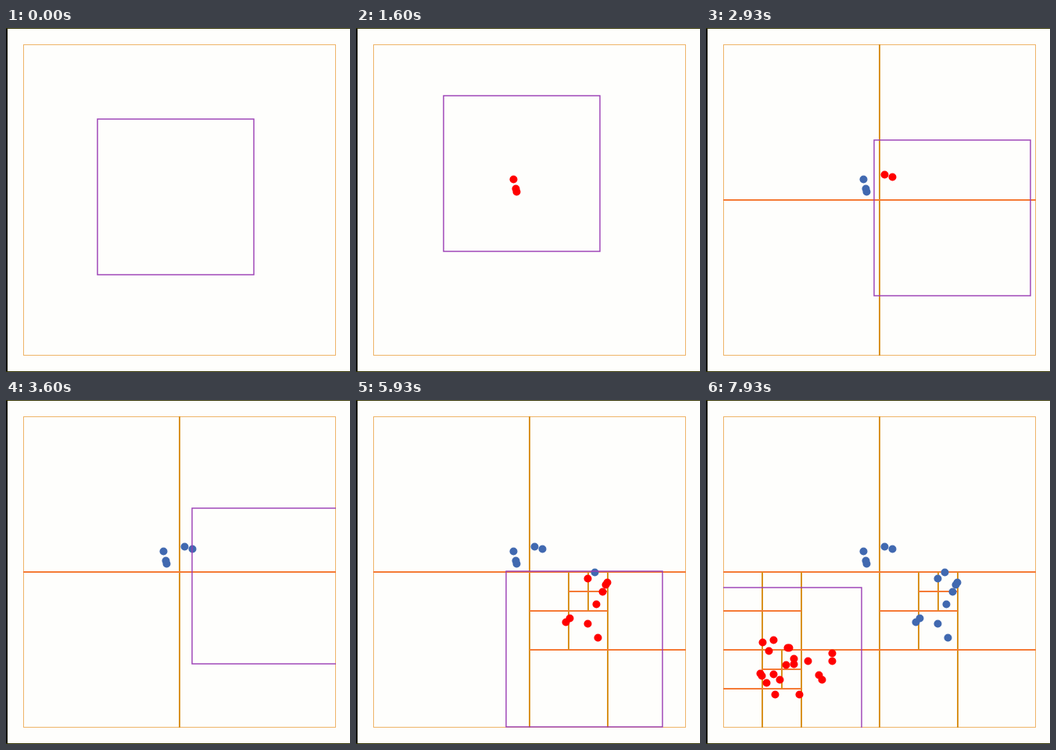
Animation, 440 px wide and 442 px high, one loop 8 s. Source, as an HTML page with a canvas:

```html
<!DOCTYPE html>
<html lang="en">
<head>
<meta charset="utf-8">
<title>Quadtree</title>
<style>
html, body { margin: 0; width: 100%; height: 100%; overflow: hidden; background: #fefefc; }
canvas { display: block; }
</style>
</head>
<body>
<canvas id="stage" width="440" height="442"></canvas>
<script>
const ctx = document.getElementById('stage').getContext('2d');
const STEPS = 120, LOOP = 8000, STEP = LOOP / STEPS;
const LEFT = 22, TOP = 21, SIZE = 400, REACH = 100, CAPACITY = 3;

// Bursts of clicks, spread evenly from first to last step.
// Stroke: start x, y, end x, y, number of clicks, gaining speed along the way.
const bursts = [
  { first: 17, last: 28, strokes: [[205, 210, 201, 194, 3], [228, 188, 238, 191, 2]] },
  { first: 60, last: 85, strokes: [
    [268, 285, 273, 280, 2], [309, 305, 296, 287, 2],
    [305, 221, 296, 229, 2], [321, 234, 307, 262, 4]] },
  { first: 93, last: 105, strokes: [
    [161, 325, 161, 335, 2], [148, 359, 130, 335, 3], [112, 332, 80, 322, 2],
    [106, 318, 104, 318, 2], [86, 308, 86, 308, 1]] },
  { first: 107, last: 118, strokes: [
    [72, 311, 72, 311, 1], [69, 351, 88, 378, 4],
    [86, 352, 119, 378, 3], [102, 340, 112, 339, 2]] }
];

// Where the pointer rests between bursts
const rests = [
  { step: 0, x: 217, y: 217 }, { step: 12, x: 210, y: 179 },
  { step: 34, x: 291, y: 249 }, { step: 54, x: 338, y: 239 },
  { step: 89, x: 292, y: 320 }, { step: 119, x: 99, y: 341 }
];

const mix = (a, b, k) => a + (b - a) * k;

function strokePoints([x0, y0, x1, y1, count]) {
  return Array.from({ length: count }, (_, i) => {
    const k = (i / Math.max(1, count - 1)) ** 2;
    return { x: Math.round(mix(x0, x1, k)), y: Math.round(mix(y0, y1, k)) };
  });
}

const drops = bursts.flatMap(({ first, last, strokes }) => {
  const points = strokes.flatMap(strokePoints);
  return points.map((p, i) =>
    ({ ...p, step: Math.round(mix(first, last, i / (points.length - 1))) }));
});

// The search box trails each click by a few pixels
const path = drops.map(d => ({ step: d.step, x: d.x - 3, y: d.y - 4 }))
  .concat(rests).sort((a, b) => a.step - b.step);

function pointerAt(step) {
  const i = path.findIndex(p => p.step > step);
  if (i < 0) return path[path.length - 1];
  const a = path[i - 1], b = path[i];
  const k = (step - a.step) / (b.step - a.step);
  return { x: Math.round(mix(a.x, b.x, k)), y: Math.round(mix(a.y, b.y, k)) };
}

const makeCell = (x, y, size) => ({ x, y, size, used: 0, kids: null });

function insert(cell, point) {
  if (cell.used < CAPACITY) {
    cell.used++;
    return;
  }
  const { x, y } = cell, half = cell.size / 2;
  if (!cell.kids) {
    cell.splitAt = point.step;
    cell.kids = [0, 1, 2, 3].map(q => makeCell(x + (q % 2) * half, y + (q >> 1) * half, half));
  }
  const quadrant = (point.x >= x + half ? 1 : 0) + (point.y >= y + half ? 2 : 0);
  insert(cell.kids[quadrant], point);
}

const root = makeCell(LEFT, TOP, SIZE);
drops.forEach(point => insert(root, point));

function bar(color, x, y, w, h) {
  ctx.fillStyle = color;
  ctx.fillRect(x, y, w, h);
}

function drawPage() {
  bar('#fefefc', 0, 0, 440, 442);
  bar('#111100', 0, 0, 2, 442);
  bar('#333300', 0, 0, 440, 1);
  bar('#333300', 0, 441, 440, 1);
}

function drawBorder() {
  ctx.strokeStyle = '#efb468';
  ctx.lineWidth = 1;
  ctx.strokeRect(LEFT + 0.5, TOP + 0.5, SIZE - 1, SIZE - 1);
}

function drawSplits({ x, y, size, kids, splitAt }, step) {
  if (!kids || splitAt > step) return;
  bar('#d9921f', x + size / 2 - 1, y, 2, size);
  bar('#f57a35', x, y + size / 2 - 1, size, 2);
  kids.forEach(kid => drawSplits(kid, step));
}

function drawPoints(step, box) {
  // A fresh click clears the highlight until the next move
  const cleared = drops.some(d => d.step === step);
  for (const { step: at, x, y } of drops) {
    if (at > step) continue;
    const inside = Math.abs(x - box.x) < REACH && Math.abs(y - box.y) < REACH - 1;
    ctx.fillStyle = inside && !cleared ? '#ff0000' : '#4169b0';
    ctx.beginPath();
    ctx.arc(x + 0.5, y + 0.5, 5, 0, Math.PI * 2);
    ctx.fill();
  }
}

function drawBox({ x, y }) {
  ctx.strokeStyle = '#9a3cb4';
  ctx.lineWidth = 1.4;
  ctx.strokeRect(x - REACH, y - REACH, REACH * 2, REACH * 2);
}

function render(time) {
  const step = Math.floor((time % LOOP + 6) / STEP) % STEPS;
  const box = pointerAt(step);
  drawPage();
  ctx.save();
  ctx.beginPath();
  ctx.rect(LEFT, TOP, SIZE, SIZE);
  ctx.clip();
  drawBorder();
  drawSplits(root, step);
  drawPoints(step, box);
  drawBox(box);
  ctx.restore();
}

const start = performance.now();
function tick() {
  render(performance.now() - start);
  requestAnimationFrame(tick);
}
tick();
</script>
</body>
</html>
```
